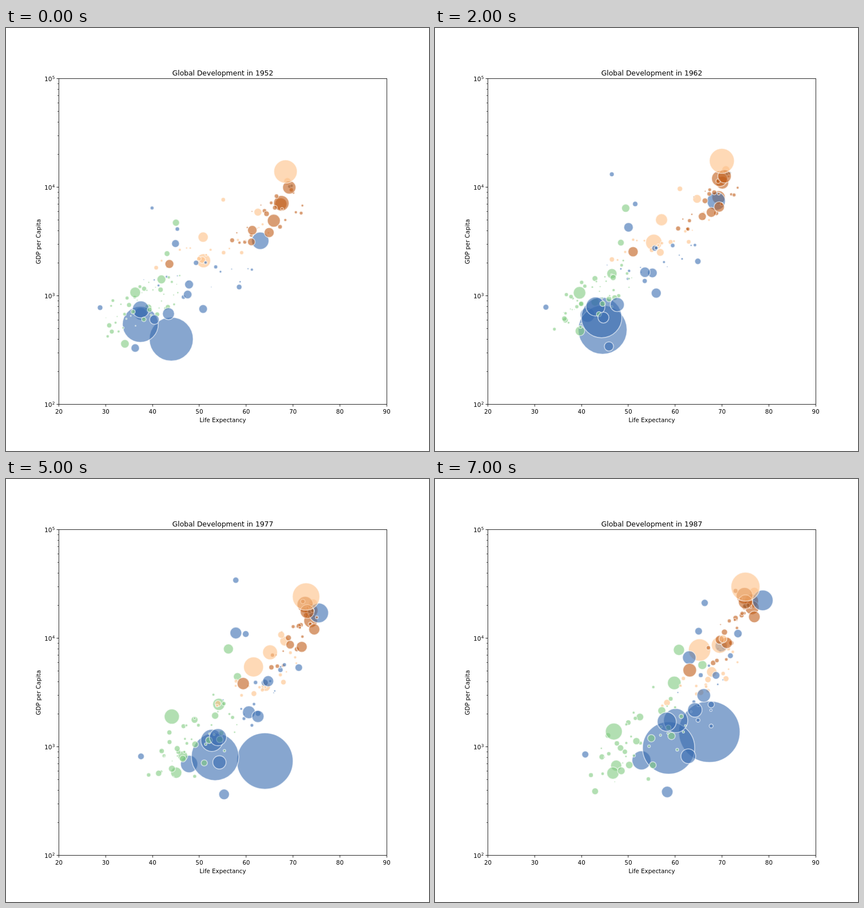
Recreate the animation shown at these times as an HTML page with a canvas. Size 748 px wide and 748 px high, loop 8000 ms.

```html
<!DOCTYPE html>
<html lang="en">
<head>
<meta charset="utf-8">
<title>Global Development</title>
<style>
html, body { margin: 0; width: 100%; height: 100%; overflow: hidden; background: #fff; }
canvas { display: block; width: 748px; height: 748px; }
</style>
</head>
<body>
<canvas id="chart" width="748" height="748"></canvas>
<script>
const ctx = document.getElementById('chart').getContext('2d');
const STEPS = 8, STEP_MS = 1000;
const LEFT = 93.5, RIGHT = 673.2, TOP = 89.76, BOTTOM = 665.72;
const AF = '#7fc97f', AM = '#fdc086', AS = '#386cb0', EU = '#bf5b17', OC = '#666666';

const mix = (a, b, t) => a + (b - a) * t;
const mixLog = (a, b, t) => a * (b / a) ** t;
const snap = v => Math.floor(v) + 0.5;
const xOf = life => mix(LEFT, RIGHT, (life - 20) / 70);
const yOf = gdp => mix(BOTTOM, TOP, (Math.log10(gdp) - 2) / 3);

// Smooth curve through evenly spaced keys; three keys give a parabola.
function curve(keys, u) {
  const last = keys.length - 1;
  const key = i => i < 0 ? 3 * keys[0] - 3 * keys[1] + keys[2]
    : i > last ? 3 * keys[last] - 3 * keys[last - 1] + keys[last - 2]
    : keys[i];
  const i = Math.min(Math.floor(u * last), last - 1), t = u * last - i;
  const [a, b, c, d] = [key(i - 1), key(i), key(i + 1), key(i + 2)];
  return b + t / 2 * (c - a + t * (2 * a - 5 * b + 4 * c - d + t * (3 * (b - c) + d - a)));
}

let seed = 11;
function rand(lo, hi) {
  seed = (seed * 16807) % 2147483647;
  return mix(lo, hi, seed / 2147483647);
}

const bubbles = [];
// Population in millions at both ends, then key points of life expectancy and GDP.
function add(color, popStart, popEnd, life, gdp) {
  const radii = [popStart, popEnd].map(pop => 1.643 * Math.sqrt(pop));
  bubbles.push({ color, radii, life, gdp: gdp.map(Math.log) });
}

// Small bubbles along a trend: each closes part of its gap to a life span of 78.
function addCloud(color, count, { life, gdp, reach, growth, pop, popGrowth }) {
  for (let i = 0; i < count; i++) {
    const rank = (i + rand(0, 1)) / count;
    const life0 = mix(...life, rank);
    const gain = (78 - life0) * mix(...reach, rand(0, 1));
    const gdp0 = mixLog(...gdp, mix(rank, rand(0, 1), 0.5));
    const gdp1 = gdp0 * mixLog(...growth, mix(rank, rand(0, 1), 0.6));
    const size = mixLog(...pop, rand(0, 1));
    add(color, size, size * popGrowth,
      [life0, life0 + gain * 0.55, life0 + gain],
      [gdp0, Math.sqrt(gdp0 * gdp1) * 1.1, gdp1]);
  }
}

// Bubbles are painted in this order.
add(AS, 8.4, 13.9, [28.8, 35, 40.8], [779, 800, 852]);
add(AF, 9.3, 23.3, [43.1, 53, 65.8], [2449, 3700, 5681]);
add(AM, 17.9, 31.6, [62.5, 66.4, 70.8], [5911, 8900, 9140]);
add(AS, 46.9, 103.8, [37.5, 44.4, 52.8], [684, 674, 752]);
add(AM, 56.6, 142.9, [50.9, 58.6, 65.2], [2109, 4130, 7807]);
add(AM, 14.8, 26.5, [68.8, 72.5, 76.9], [11367, 17460, 26627]);
add(AS, 556, 1084, [44, 50.5, 44.5, 58.4, 63.1, 64, 65.5, 67.3], [400, 576, 488, 613, 677, 741, 962, 1379]);
add(AM, 12.4, 31, [50.6, 60.8, 67.8], [2144, 2957, 4903]);
add(AF, 14.1, 35.5, [39.1, 45, 47.4], [781, 883, 673]);
add(AF, 22.2, 52.8, [41.9, 50.2, 59.8], [1419, 1917, 3885]);
add(AF, 20.9, 42.9, [34.1, 42.8, 46.7], [362, 541, 574]);
add(EU, 42.5, 55.6, [67.4, 72, 76.3], [7030, 14470, 22066]);
add(EU, 69.1, 77.7, [67.5, 71, 74.8], [7144, 16300, 24639]);
add(AS, 372, 788, [37.4, 49, 58.6], [547, 713, 977]);
add(AS, 82.1, 169.3, [37.5, 47.6, 60.1], [750, 920, 1748]);
add(AS, 17.3, 51.9, [44.9, 53.9, 63], [3035, 4680, 11080, 6643]);
add(AS, 5.4, 16.5, [45.3, 55.8, 65], [4130, 9250, 11643]);
add(EU, 47.7, 56.7, [65.9, 71.6, 76.4], [4931, 11100, 19207]);
add(AS, 86.5, 122.1, [63, 72.4, 78.7], [3217, 12060, 22376]);

addCloud(EU, 22, { life: [57, 72.5], gdp: [2600, 11000], reach: [0.35, 0.75], growth: [1.8, 3], pop: [0.4, 10], popGrowth: 1.25 });
addCloud(AM, 17, { life: [40, 66], gdp: [1700, 4800], reach: [0.4, 0.7], growth: [1, 2], pop: [0.6, 8], popGrowth: 2.2 });
addCloud(AS, 16, { life: [38, 62], gdp: [700, 3000], reach: [0.4, 0.75], growth: [1, 5], pop: [0.3, 9], popGrowth: 2.2 });
addCloud(AF, 43, { life: [30, 46], gdp: [380, 1900], reach: [0.2, 0.55], growth: [0.7, 2.4], pop: [0.2, 9], popGrowth: 2.3 });
addCloud(OC, 2, { life: [69, 70], gdp: [10000, 10600], reach: [0.6, 0.8], growth: [1.8, 2.2], pop: [2, 9], popGrowth: 1.8 });

add(AS, 20.9, 41.6, [47.5, 60.2, 69.8], [1031, 2480, 8533]);
add(AM, 30.1, 80.1, [50.8, 61.3, 69.5], [3478, 6260, 8688]);
add(AF, 6.4, 12.9, [31.3, 39.2, 42.9], [469, 640, 390]);
add(AS, 20.1, 38, [36.3, 51.3, 58.3], [331, 353, 385]);
add(AF, 33.1, 81.6, [36.3, 41.9, 46.9], [1077, 1105, 1890, 1385]);
add(AS, 41.3, 105.2, [43.4, 50.8, 58.2], [685, 995, 1705]);
add(AS, 22.4, 60, [47.8, 57.3, 64.2], [1273, 1900, 2190]);
add(EU, 25.7, 37.7, [61.3, 70.6, 71], [4029, 7250, 9082]);
add(EU, 16.6, 22.7, [61.1, 68.1, 69.5], [3145, 7200, 9696]);
add(AS, 4, 14.6, [39.9, 51.9, 66.3], [6460, 14850, 33900, 21198]);
add(AF, 14.3, 35.9, [45, 52.8, 60.8], [4725, 7430, 7826]);
add(EU, 28.5, 38.9, [64.9, 72.2, 76.9], [3834, 9220, 15765]);
add(AS, 8.6, 19.7, [58.5, 68.5, 73.4], [1207, 3280, 11055]);
add(AS, 21.3, 52.9, [50.8, 59.4, 66.1], [758, 1405, 2983]);
add(EU, 22.2, 52.9, [43.6, 55.6, 63.1], [1969, 3120, 5089]);
add(EU, 50.4, 57, [69.2, 71.7, 75], [9980, 15000, 21665]);
add(AM, 157.6, 242.8, [68.4, 71.3, 75], [13990, 20640, 29884]);
add(AM, 5.4, 17.9, [55.1, 64.6, 70.2], [7690, 10600, 9884]);
add(AS, 26.2, 62.8, [40.4, 49, 62.8], [605, 668, 821]);

function text(str, x, y, size = 10.39, align = 'center') {
  ctx.font = size + 'px "DejaVu Sans", sans-serif';
  ctx.textAlign = align;
  ctx.fillText(str, x, y);
}

function line(x1, y1, x2, y2, width) {
  ctx.lineWidth = width;
  ctx.beginPath();
  ctx.moveTo(x1, y1);
  ctx.lineTo(x2, y2);
  ctx.stroke();
}

function drawBubbles(u) {
  ctx.save();
  ctx.globalAlpha = 0.6;
  ctx.strokeStyle = '#fff';
  ctx.lineWidth = 1.56;
  for (const { color, radii, life, gdp } of bubbles) {
    ctx.fillStyle = color;
    ctx.beginPath();
    ctx.arc(xOf(curve(life, u)), yOf(Math.exp(curve(gdp, u))), mix(...radii, u), 0, Math.PI * 2);
    ctx.fill();
    ctx.stroke();
  }
  ctx.restore();
}

function drawAxes(year) {
  ctx.fillStyle = ctx.strokeStyle = '#000';
  const left = snap(LEFT), bottom = snap(BOTTOM);
  for (let life = 20; life <= 90; life += 10) {
    const x = xOf(life);
    line(snap(x), bottom, snap(x), bottom + 4, 0.83);
    text(life, x, 682);
  }
  for (let power = 2; power <= 5; power++) {
    const y = yOf(10 ** power), base = Math.round(y + 4.3);
    line(left - 4, snap(y), left, snap(y), 0.83);
    text('10', 81.3, base, 10.39, 'right');
    text(power, 81.8, base - 4, 7.27, 'left');
    for (let m = 2; m < 10 && power < 5; m++) {
      const minor = snap(yOf(m * 10 ** power));
      line(left - 2.5, minor, left, minor, 0.62);
    }
  }
  ctx.lineWidth = 0.83;
  ctx.strokeRect(left, snap(TOP), snap(RIGHT) - left, bottom - snap(TOP));
  const midX = (LEFT + RIGHT) / 2;
  text('Global Development in ' + year, midX, 84, 12.47);
  text('Life Expectancy', midX, 697);
  ctx.save();
  ctx.translate(61, (TOP + BOTTOM) / 2);
  ctx.rotate(-Math.PI / 2);
  text('GDP per Capita', 0, 0);
  ctx.restore();
}

function render(now) {
  const step = Math.floor(now / STEP_MS) % STEPS;
  ctx.fillStyle = '#fff';
  ctx.fillRect(0, 0, 748, 748);
  drawBubbles(step / (STEPS - 1));
  drawAxes(1952 + step * 5);
  requestAnimationFrame(render);
}
requestAnimationFrame(render);
</script>
</body>
</html>
```
